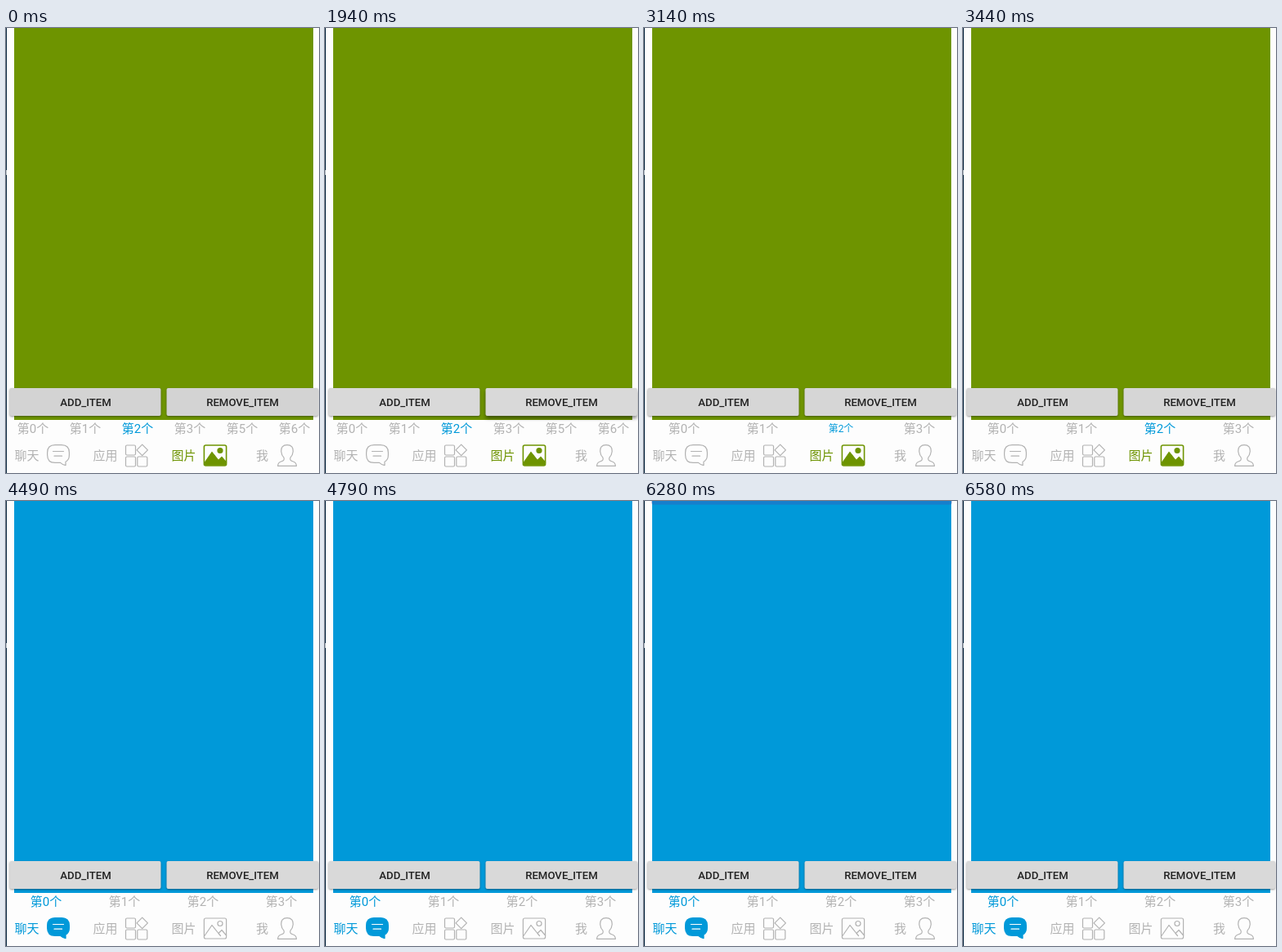
Recreate the animation shown at these times as an HTML page. Size 383 px wide and 545 px high, loop 7.03 s.

```html
<!DOCTYPE html>
<html lang="zh-CN">
<head>
<meta charset="utf-8">
<title>Tabs</title>
<style>
  html, body { margin: 0; height: 100%; overflow: hidden; background: #fdfdfd; }
  svg { display: block; width: 100vw; height: 100vh; font: 15px Roboto, "Noto Sans CJK SC", "Noto Sans CJK", sans-serif; }
  .button { filter: drop-shadow(0 1.5px 1px rgba(0,0,0,.4)); }
  .button.pressed { filter: drop-shadow(0 3px 2px rgba(0,0,0,.45)); }
  .caption { font: 500 13.2px Roboto, sans-serif; fill: #222; }
  #tabs, .caption { text-anchor: middle; }
  .nav { color: #b2b2b2; }
  .nav text { fill: currentColor; }
  .icon { fill: none; stroke: currentColor; stroke-width: 1.2; stroke-linejoin: round; stroke-linecap: round; }
  #chat.on { color: #0099d9; }
  #chat.on .bubble { fill: currentColor; }
  #chat.on .lines { stroke: #fff; }
  #photo.on { color: #6e9400; }
  #photo.on .solid { fill: currentColor; }
  #photo.on .frame { stroke-width: 1.6; }
</style>
</head>
<body>
<svg viewBox="0 0 383 545">
  <rect width="383" height="545" fill="#fdfdfd"/>
  <rect width="1" height="545" fill="#0b2a42"/>
  <rect y="174" width="1" height="6" fill="#b8c0c6"/>
  <rect id="page" x="10" width="366" height="480"/>
  <rect id="glow" x="9" y="-8" width="368" rx="3" fill="#3f51b5"/>
  <g id="buttons">
    <rect class="button" x="4.5" y="441" width="185" height="34" rx="2"/>
    <rect class="button" id="remove" x="196.5" y="441" width="185.5" height="34" rx="2"/>
  </g>
  <text class="caption" x="97.5" y="462.7">ADD_ITEM</text>
  <text class="caption" x="289.5" y="462.7">REMOVE_ITEM</text>
  <g id="tabs"></g>

  <g class="nav" id="chat">
    <text x="10.5" y="529">聊天</text>
    <g class="icon">
      <path class="bubble" d="M60 510.6H68Q77.4 510.6 77.4 520V523Q77.4 529 73 531.2V535.6Q69 534.8 66.5 532.4H60Q50.6 532.4 50.6 523V520Q50.6 510.6 60 510.6Z"/>
      <path class="lines" d="M57.5 518.5H70.5M59 524.2H68.5"/>
    </g>
  </g>
  <g class="nav">
    <text x="106.5" y="529">应用</text>
    <g class="icon">
      <rect x="146.5" y="511" width="12" height="12" rx="1.5"/>
      <rect x="146.5" y="525" width="12" height="12" rx="1.5"/>
      <rect x="160.8" y="525" width="12" height="12" rx="1.5"/>
      <path d="M166.7 510.2L173.4 516.9L166.7 523.6L160 516.9Z"/>
    </g>
  </g>
  <g class="nav" id="photo">
    <text x="202.5" y="529">图片</text>
    <g class="icon">
      <path class="solid" d="M242.6 533L252 519.5L260 529.5L264 525.5L269.6 532V535.8H242.6Z" stroke="none"/>
      <path d="M242.6 533L252 519.5L260 529.5L264 525.5L269.6 532M260 529.5L262.5 532.5"/>
      <rect class="frame" x="242.4" y="511" width="27.2" height="25" rx="2"/>
      <circle class="solid" cx="262" cy="517.5" r="3"/>
    </g>
  </g>
  <g class="nav">
    <text x="306" y="529">我</text>
    <path class="icon" d="M344 510.6C338.5 510.6 336.4 514 336.7 518.5C337 522 338.4 524.5 340 526.2C341 529 339.5 530 336.5 531C333.5 532 332.6 533.5 332.6 536.4H355.4C355.4 533.5 354.5 532 351.5 531C348.5 530 347 529 348 526.2C349.6 524.5 351 522 351.3 518.5C351.6 514 349.5 510.6 344 510.6Z"/>
  </g>
</svg>
<script>
const LOOP = 7030, BLUE = "#0099d9";
const $ = id => document.getElementById(id);

// Value of the last [start, value] step reached at time t
const step = (t, steps) => steps.filter(s => s[0] <= t).pop()[1];

const shades = [[0, "#d3d3d3"], [1940, "#d9d9d9"], [3140, "#d6d6d6"], [4490, "#d9d9d9"]];
const labels = [[0, [0, 1, 2, 3, 5, 6]], [2090, [0, 1, 2, 3, 5]], [3140, [0, 1, 2, 3]]];
const pops = [[0, 1], [2240, .86], [2390, 1], [3140, .8], [3290, .9], [3440, 1], [4640, .88], [4790, 1]];
const glows = [[0, [0, 0]], [6130, [5, .52]], [6280, [4.5, .36]], [6430, [2.6, .2]], [6580, [0, 0]]];

function drawTabs(names, selected, scale) {
  const width = 384 / names.length;
  $("tabs").innerHTML = names.map((n, i) => {
    const on = i === selected;
    return `<text y="5.7" fill="${on ? BLUE : "#b2b2b2"}"
      transform="translate(${1 + width * (i + .5)} 490.7) scale(${on ? scale : 1})">第${n}个</text>`;
  }).join("");
}

let last = "";
function draw(t) {
  const chat = t >= 4490;
  const names = step(t, labels), scale = step(t, pops);
  const [height, alpha] = step(t, glows);
  $("page").setAttribute("fill", chat ? BLUE : "#6e9400");
  $("chat").classList.toggle("on", chat);
  $("photo").classList.toggle("on", !chat);
  $("buttons").setAttribute("fill", step(t, shades));
  $("remove").classList.toggle("pressed", t >= 1940 && t < 2240);
  $("glow").setAttribute("height", 8 + height);
  $("glow").setAttribute("opacity", alpha);
  const key = [names, chat, scale].join();
  if (key !== last) drawTabs(names, chat ? 0 : 2, scale);
  last = key;
}

const start = performance.now();
function tick() {
  draw((performance.now() - start) % LOOP);
  requestAnimationFrame(tick);
}
tick();
</script>
</body>
</html>
```
